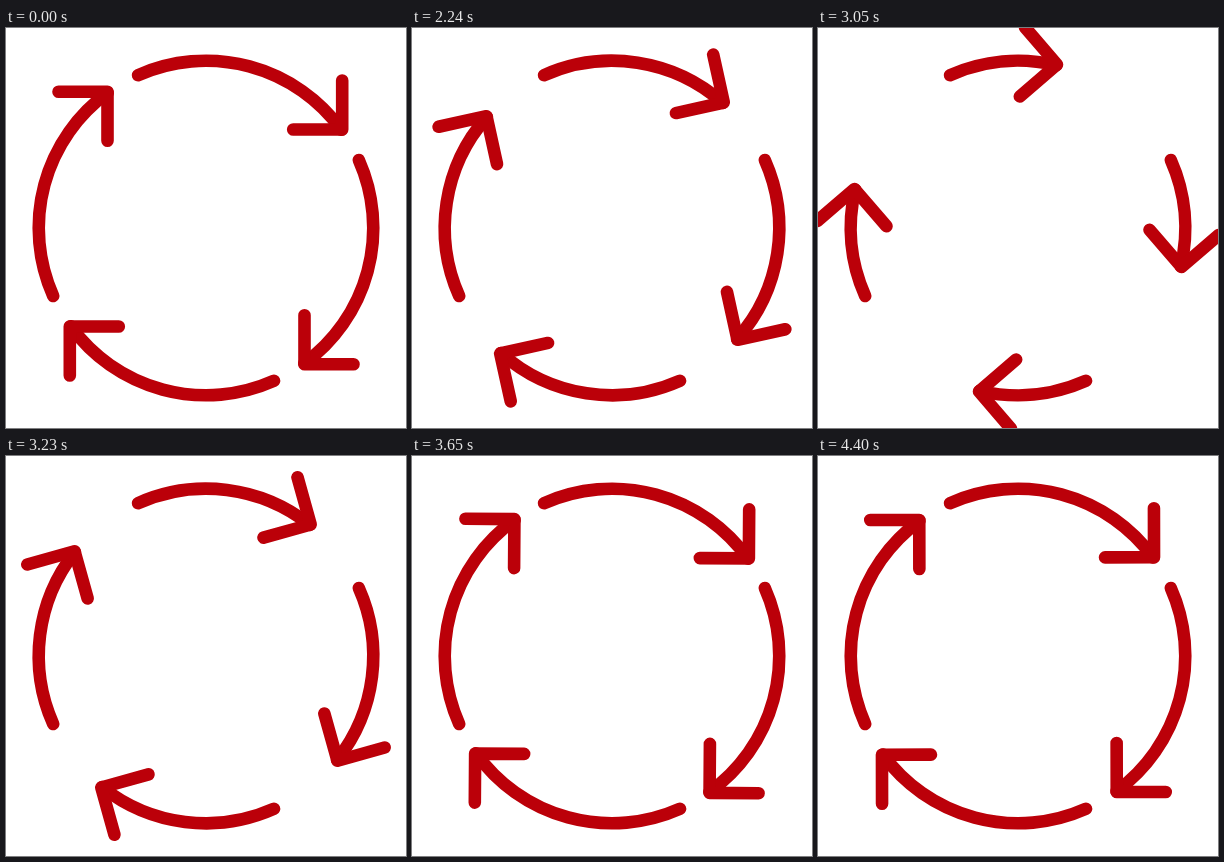
These frames come from a looping animation (400x400 px, 4430 ms). An HTML page without scripts:

```html
<!DOCTYPE html>
<html lang="en">
<head>
<meta charset="utf-8">
<title>Cycle arrows</title>
<style>
  /* Degrees the arrowheads are turned from rest; the arcs follow. */
  @property --turn {
    syntax: "<number>";
    inherits: true;
    initial-value: 0;
  }

  html, body {
    margin: 0;
    width: 100%;
    height: 100%;
    overflow: hidden;
    background: #fff;
  }

  svg {
    display: block;
    width: 100%;
    height: 100%;
    fill: none;
    stroke: #bb0009;
    stroke-width: 12.6;
    stroke-linecap: round;
    stroke-linejoin: round;
    animation: swing 4430ms cubic-bezier(.333, 0, .667, 1) infinite;
  }

  .arc {
    stroke-dasharray: 100 200;
    stroke-dashoffset: calc((22 - var(--turn)) * 1px);
  }

  .head {
    transform: rotate(calc(var(--turn) * 1deg));
  }

  @keyframes swing {
    0%, 45.15% { --turn: 0; }
    63.53% { --turn: -59; }
    78.67% { --turn: 5; }
    88.83% { --turn: -10; }
    100% { --turn: 0; }
  }
</style>
</head>
<body>
<svg viewBox="-200 -200 400 400">
  <defs>
    <g id="arrow">
      <path class="arc" pathLength="90" d="M-68-152.8A167.2 167.2 0 0 1 152.8-68"/>
      <path class="head" d="M136.2-147.5v49h-49"/>
    </g>
  </defs>
  <use href="#arrow"/>
  <use href="#arrow" transform="rotate(90)"/>
  <use href="#arrow" transform="rotate(180)"/>
  <use href="#arrow" transform="rotate(270)"/>
</svg>
</body>
</html>
```
